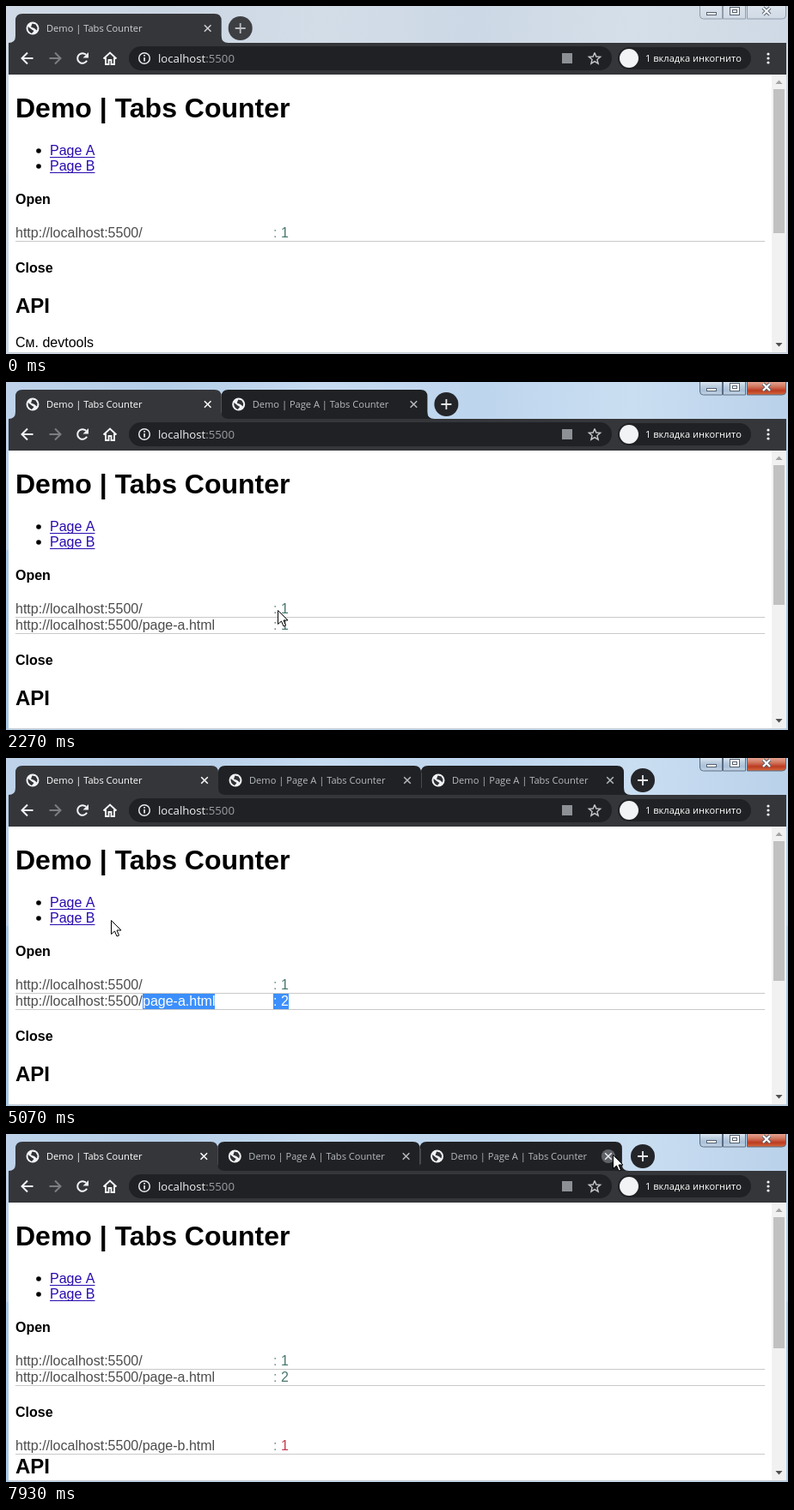
An HTML page with a canvas that plays this animation: 910 px wide and 406 px high, repeating every 8000 ms.

```html
<!DOCTYPE html>
<html lang="ru">
<head>
<meta charset="utf-8">
<title>Demo | Tabs Counter</title>
<style>
html, body { margin: 0; width: 100%; height: 100%; overflow: hidden; background: #fff; }
canvas { display: block; }
</style>
</head>
<body>
<canvas id="stage" width="910" height="406"></canvas>
<script>
const c = document.getElementById('stage').getContext('2d');
const LOOP = 8000;
const UI = '"Open Sans", "Noto Sans", sans-serif';
const PAGE = '"Liberation Sans", Arial, sans-serif';
const DARK = '#202124', BAR = '#35363a';

// Cursor stops: time, x, y
const PATH = [
  [70, 520, 330], [750, 91, 164], [1050, 91, 164], [1450, 156, 177], [1750, 156, 177],
  [2150, 320, 268], [2250, 320, 268], [2530, 91, 164], [2640, 91, 164], [2780, 163, 177],
  [2930, 163, 177], [3415, 331, 286], [3920, 159, 287], [4650, 159, 285], [5070, 122, 189],
  [5250, 91, 187], [5400, 91, 187], [5650, 156, 201], [5950, 156, 201], [6600, 681, 143],
  [7150, 706, 24]
];
// Menus: open, close, left, top
const MENUS = [[900, 1580, 91, 164], [2590, 2880, 91, 164], [5330, 5900, 91, 187]];
// Tabs: opening time, loaded time, title
const TABS = [
  [-500, -400, 'Demo | Tabs Counter'],
  [1621, 1920, 'Demo | Page A | Tabs Counter'],
  [2940, 3190, 'Demo | Page A | Tabs Counter'],
  [5960, 6220, 'Demo | Page B | Tabs Counter']
];
const SHUT = 7750, CLOSED = 7785;

const clamp = (v, a, b) => Math.max(a, Math.min(b, v));
const easeOut = p => 1 - (1 - clamp(p, 0, 1)) ** 2;
const smooth = p => p * p * (3 - 2 * p);

function rect(x, y, w, h, fill) {
  c.fillStyle = fill;
  c.fillRect(x, y, w, h);
}
function pill(x, y, w, h, r, fill) {
  c.fillStyle = fill;
  c.beginPath();
  c.roundRect(x, y, w, h, r);
  c.fill();
}
function disc(x, y, r, fill) {
  c.fillStyle = fill;
  c.beginPath();
  c.arc(x, y, r, 0, 7);
  c.fill();
}
function text(s, x, y, font, fill, align = 'left') {
  c.font = font;
  c.fillStyle = fill;
  c.textAlign = align;
  c.fillText(s, x, y);
}
function stroke(color, width, ...lines) {
  c.strokeStyle = color;
  c.lineWidth = width;
  c.beginPath();
  for (const pts of lines) {
    for (let i = 0; i < pts.length; i += 2) {
      if (i) c.lineTo(pts[i], pts[i + 1]);
      else c.moveTo(pts[i], pts[i + 1]);
    }
  }
  c.stroke();
}
function gradient(x0, y0, x1, y1, colors) {
  const g = c.createLinearGradient(x0, y0, x1, y1);
  colors.forEach((k, i) => g.addColorStop(i / (colors.length - 1), k));
  return g;
}

function cursorAt(t) {
  const i = PATH.findIndex(k => k[0] > t);
  if (i < 0) return PATH[PATH.length - 1].slice(1);
  const [t0, x0, y0] = PATH[Math.max(0, i - 1)], [t1, x1, y1] = PATH[i];
  const p = smooth(clamp((t - t0) / (t1 - t0 || 1), 0, 1));
  return [x0 + (x1 - x0) * p, y0 + (y1 - y0) * p];
}

function drawGlass(active) {
  const tones = active
    ? ['#bed3ea', '#b5cde8', '#c6dbf0', '#bdd5ed', '#cadef1', '#b9d1ea']
    : ['#d0dae6', '#cbd6e3', '#d3dde8', '#ccd8e5', '#d5dfe9', '#cfd9e5'];
  rect(0, 0, 910, 406, gradient(0, 0, 910, 60, tones));
  rect(0, 196, 3, 210, active ? '#a9c9e8' : '#cbd8e6');
  rect(908, 196, 2, 210, active ? '#a9c9e8' : '#cbd8e6');
}

function drawWindowButtons(active) {
  const pale = active ? ['#dce7f2', '#bccee0', '#a9c0d8', '#c7d8e8'] : ['#dbe3ec', '#d0dae5'];
  const red = active ? ['#e5a391', '#d27a63', '#bb3b20', '#d66a43'] : pale;
  const edge = active ? '#596b80' : '#8f9cab';
  const glyph = active ? '#fff' : '#f4f6f8';
  [[807, 27, pale], [834, 27, pale], [862, 46, red]].forEach(([x, w, tones], i) => {
    c.beginPath();
    c.roundRect(x + .5, -4, w - 1, 19, [0, 0, i === 2 ? 4 : 0, i === 0 ? 4 : 0]);
    c.fillStyle = gradient(0, 0, 0, 15, tones);
    c.fill();
    c.strokeStyle = edge;
    c.lineWidth = 1;
    c.stroke();
  });
  c.fillStyle = glyph;
  c.strokeStyle = '#56626f';
  c.fillRect(815, 7, 11, 4);
  c.strokeRect(815.5, 7.5, 11, 3);
  c.strokeRect(842.5, 1.5, 11, 9);
  c.fillRect(843, 2, 10, 8);
  c.strokeRect(845.5, 4.5, 5, 3);
  const cross = [[881, 2, 889, 10], [889, 2, 881, 10]];
  stroke('#56626f', 4, ...cross);
  stroke(glyph, 2.2, ...cross);
}

function globe(x, y) {
  disc(x, y, 7.5, '#f1f3f4');
  c.fillStyle = '#303236';
  c.beginPath();
  c.moveTo(x - 5.5, y - 2);
  c.lineTo(x - 1, y + 1.5);
  c.lineTo(x + 1.5, y + 3);
  c.lineTo(x - 1, y + 6);
  c.quadraticCurveTo(x - 6, y + 4, x - 5.5, y - 2);
  c.moveTo(x - .5, y - 5.5);
  c.lineTo(x + 3.5, y - 4.5);
  c.lineTo(x + 5.5, y - 1);
  c.lineTo(x + 5, y + 2.5);
  c.lineTo(x + 2, y);
  c.lineTo(x - 2, y - 1.5);
  c.fill();
}

function tabShape(l, r, fill) {
  const w = Math.min(8, (r - l) / 2);
  c.fillStyle = fill;
  c.beginPath();
  c.moveTo(l - 8, 43);
  c.quadraticCurveTo(l, 43, l, 35);
  c.lineTo(l, 9 + w);
  c.quadraticCurveTo(l, 9, l + w, 9);
  c.lineTo(r - w, 9);
  c.quadraticCurveTo(r, 9, r, 9 + w);
  c.lineTo(r, 35);
  c.quadraticCurveTo(r, 43, r + 8, 43);
  c.fill();
}

function drawTab(tab, l, r, i, t, cur) {
  const front = i === 0;
  tabShape(l, r, front ? BAR : DARK);
  if (i > 1) rect(Math.round(l), 17, 1, 18, '#46484c');
  c.save();
  c.beginPath();
  c.rect(l, 9, r - l, 34);
  c.clip();
  const loading = t < tab[1];
  if (loading) {
    const a = (t - tab[0]) / 160 - 1.6;
    c.strokeStyle = '#e8eaed';
    c.lineWidth = 2;
    c.beginPath();
    c.arc(l + 20, 26, 7, a - .15 - clamp((t - tab[0] - 60) / 150, 0, 2), a);
    c.stroke();
  } else globe(l + 20, 26);

  const color = front ? (t < 70 ? '#cdd0d4' : '#ffffff') : '#b6babf';
  const end = r - 30;
  if (end > l + 40) {
    c.save();
    c.beginPath();
    c.rect(l + 36, 9, end - l - 36, 34);
    c.clip();
    const title = loading ? 'localhost:5500/page-' + (i > 2 ? 'b' : 'a') + '.html' : tab[2];
    c.font = '11.1px ' + UI;
    const fits = c.measureText(title).width < end - l - 36;
    text(title, l + 36, 30, '11.1px ' + UI,
      fits ? color : gradient(end - 18, 0, end, 0, [color, color + '00']));
    c.restore();
  }
  const x = r - 16;
  if (r - l > 40) {
    const hover = Math.hypot(cur[0] - x, cur[1] - 26) < 9;
    if (hover) disc(x, 26, 8, '#5f6368');
    stroke(hover ? '#e8eaed' : color, 1.5,
      [x - 3.8, 22.2, x + 3.8, 29.8], [x + 3.8, 22.2, x - 3.8, 29.8]);
  }
  c.restore();
}

function drawTabs(t, cur) {
  const shares = TABS.map(k => easeOut((t - k[0]) / 200));
  shares[3] *= 1 - easeOut((t - SHUT) / 200);
  const total = shares.reduce((a, b) => a + b);
  const unit = Math.min(239.7, 708 / total);
  const spans = [];
  let x = 11;
  for (const s of shares) spans.push([x, x += s * unit]);
  for (let i = 3; i >= 0; i--) {
    const [l, r] = spans[i];
    if (r - l > 3) drawTab(TABS[i], l, r, i, t, cur);
  }
  const px = x + 22;
  disc(px, 26, 14, t < 70 ? '#3d3f43' : '#242529');
  stroke(t < 70 ? '#b9bcc0' : '#e8eaed', 1.8, [px - 6, 26, px + 6, 26], [px, 20, px, 32]);
}

function arrow(x, dir, color) {
  stroke(color, 2, [x - 6.5 * dir, 61, x + 6.5 * dir, 61],
    [x, 54.5, x - 6.5 * dir, 61, x, 67.5]);
}

function drawToolbar() {
  rect(3, 43, 905, 37, BAR);
  arrow(25, 1, '#f1f3f4');
  arrow(57, -1, '#7b7e83');
  c.strokeStyle = '#f1f3f4';
  c.lineWidth = 2;
  c.beginPath();
  c.arc(89, 61, 5.8, .5, 5.5);
  c.stroke();
  c.fillStyle = '#f1f3f4';
  c.beginPath();
  c.moveTo(96, 54);
  c.lineTo(96, 60.5);
  c.lineTo(89.5, 60.5);
  c.fill();
  stroke('#f1f3f4', 1.9, [113.5, 61.5, 121, 54.5, 128.5, 61.5],
    [116, 60, 116, 68, 119.5, 68, 119.5, 63, 122.5, 63, 122.5, 68, 126, 68, 126, 60]);

  pill(143, 47, 562, 28, 14, DARK);
  c.strokeStyle = '#e8eaed';
  c.lineWidth = 1.5;
  c.beginPath();
  c.arc(161, 61, 6.3, 0, 7);
  c.stroke();
  rect(160.2, 60, 1.7, 4.5, '#e8eaed');
  rect(160.2, 57, 1.7, 1.7, '#e8eaed');
  const font = '13.2px ' + UI;
  text('localhost', 177, 66, font, '#f1f3f4');
  text(':5500', 177 + c.measureText('localhost').width, 66, font, '#9aa0a6');
  rect(647, 55, 12, 12, '#8d9196');

  const star = [];
  for (let i = 0; i <= 10; i++) {
    const a = i * Math.PI / 5 - Math.PI / 2, r = i % 2 ? 3.1 : 7;
    star.push(685 + r * Math.cos(a), 61.5 + r * Math.sin(a));
  }
  stroke('#c4c7cb', 1.4, star);

  pill(712, 48, 155, 26, 13, DARK);
  disc(725, 61, 11, '#f1f3f4');
  text('1 вкладка инкогнито', 744, 65, '11.1px ' + UI, '#ffffff');
  for (const y of [56, 61, 66]) disc(887, y, 1.6, '#f1f3f4');
}

function drawRow(url, count, y, color) {
  text(url, 11, y, '16px ' + PAGE, '#4c4c4c');
  text(':', 311, y, '16px ' + PAGE, '#7f8c8c');
  text(count, 320, y, '16px ' + PAGE, color);
  rect(11, y + 4, 872, 1, '#c9c9c9');
}

function drawSelection(t, x) {
  if (t < 3415 || t > 6230) return;
  const left = t < 3920 ? x : 159;
  for (const [l, r, s] of [[311, 329, ': 2'], [159, 243, 'page-a.html']]) {
    const from = Math.max(l, left);
    if (from >= r) continue;
    c.save();
    c.beginPath();
    c.rect(from, 275, r - from, 18);
    c.clip();
    rect(l, 275, r - l, 18, '#3c8ffc');
    text(s, l, 289, '16px ' + PAGE, '#fff');
    c.restore();
  }
}

function drawPage(t, cur) {
  c.save();
  c.beginPath();
  c.rect(3, 80, 905, 324);
  c.clip();
  rect(3, 80, 905, 324, '#fff');
  const bold = 'bold 16px ' + PAGE;
  text('Demo | Tabs Counter', 11, 130, 'bold 32px ' + PAGE, '#000');
  ['Page A', 'Page B'].forEach((s, i) => {
    const y = 174 + 18 * i;
    disc(38, y - 5, 2.8, '#000');
    text(s, 51, y, '16px ' + PAGE, '#2a0bb0');
    rect(51, y + 2, c.measureText(s).width, 1, '#2a0bb0');
  });
  text('Open', 11, 231, bold, '#000');

  const base = 'http://localhost:5500/';
  const open = [[base, 1]], closed = [];
  if (t >= TABS[1][1]) open.push([base + 'page-a.html', t < TABS[2][1] ? 1 : 2]);
  if (t >= 6230 && t < CLOSED) open.push([base + 'page-b.html', 1]);
  if (t >= CLOSED) closed.push([base + 'page-b.html', 1]);
  let y = 270;
  for (const [url, n] of open) {
    drawRow(url, n, y, '#49776f');
    y += 19;
  }
  drawSelection(t, cur[0]);
  y += 22;
  text('Close', 11, y, bold, '#000');
  y += 39;
  for (const [url, n] of closed) {
    drawRow(url, n, y, '#c43d52');
    y += 19;
  }
  y += 8;
  text('API', 11, y, 'bold 24px ' + PAGE, '#000');
  text('См. devtools', 11, y + 40, '16px ' + PAGE, '#000');

  rect(891, 80, 17, 324, '#f1f1f1');
  rect(893, 97, 13, 173 - 5 * (open.length + closed.length + (closed.length ? 1 : 0)), '#c1c1c1');
  for (const [ay, d, fill] of [[89, -1, '#a3a3a3'], [395, 1, '#505050']]) {
    c.fillStyle = fill;
    c.beginPath();
    c.moveTo(895.5, ay - 2 * d);
    c.lineTo(903.5, ay - 2 * d);
    c.lineTo(899.5, ay + 2.5 * d);
    c.fill();
  }
  c.restore();
  rect(3, 404, 905, 1, '#c5ccd4');
}

function drawMenu([from, to, x, y], t, cur) {
  if (t < from || t >= to) return;
  c.save();
  c.globalAlpha = clamp((t - from) / 120, .2, 1);
  c.translate(x, y);
  c.shadowColor = 'rgba(0,0,0,.55)';
  c.shadowBlur = 3;
  c.shadowOffsetX = c.shadowOffsetY = 2;
  rect(0, 0, 386, 174, '#c6c6c6');
  c.shadowColor = 'transparent';
  rect(1, 1, 384, 172, '#fff');
  const items = [
    [17, 'Открыть ссылку в новой вкладке'], [41, 'Открыть ссылку в новом окне'],
    [65, 'Открыть ссылку в окне в режиме инкогнито'], [100, 'Сохранить ссылку как...'],
    [124, 'Копировать адрес ссылки'], [159, 'Просмотреть код']
  ];
  for (const [iy, label] of items) {
    if (cur[0] > x + 1 && Math.abs(cur[1] - y - iy) < 12) rect(1, iy - 12, 384, 24, '#c4c4c4');
    text(label, 25, iy + 4, '11.4px ' + UI, iy === 65 ? '#7d7d7d' : '#222');
  }
  text('Ctrl + Shift + I', 362, 163, '11.4px ' + UI, '#222', 'right');
  rect(1, 81, 384, 1, '#dcdcdc');
  rect(1, 140, 384, 1, '#dcdcdc');
  c.restore();
}

function drawCursor([x, y]) {
  c.save();
  c.translate(Math.round(x) + .5, Math.round(y) + .5);
  c.beginPath();
  c.moveTo(0, 0);
  for (const [px, py] of [[0, 16], [4, 12.5], [6.5, 18.5], [9, 17.5], [6.5, 11.5], [11.5, 11.5]]) {
    c.lineTo(px, py);
  }
  c.closePath();
  c.fillStyle = '#fff';
  c.fill();
  c.strokeStyle = '#000';
  c.lineWidth = 1;
  c.stroke();
  c.restore();
}

function draw(t) {
  const active = t >= 70;
  const cur = active ? cursorAt(t) : [-99, -99];
  drawGlass(active);
  drawWindowButtons(active);
  drawTabs(t, cur);
  drawToolbar();
  drawPage(t, cur);
  for (const m of MENUS) drawMenu(m, t, cur);
  drawCursor(cur);
}

const start = performance.now();
function tick() {
  draw((performance.now() - start) % LOOP);
  requestAnimationFrame(tick);
}
tick();
</script>
</body>
</html>
```
